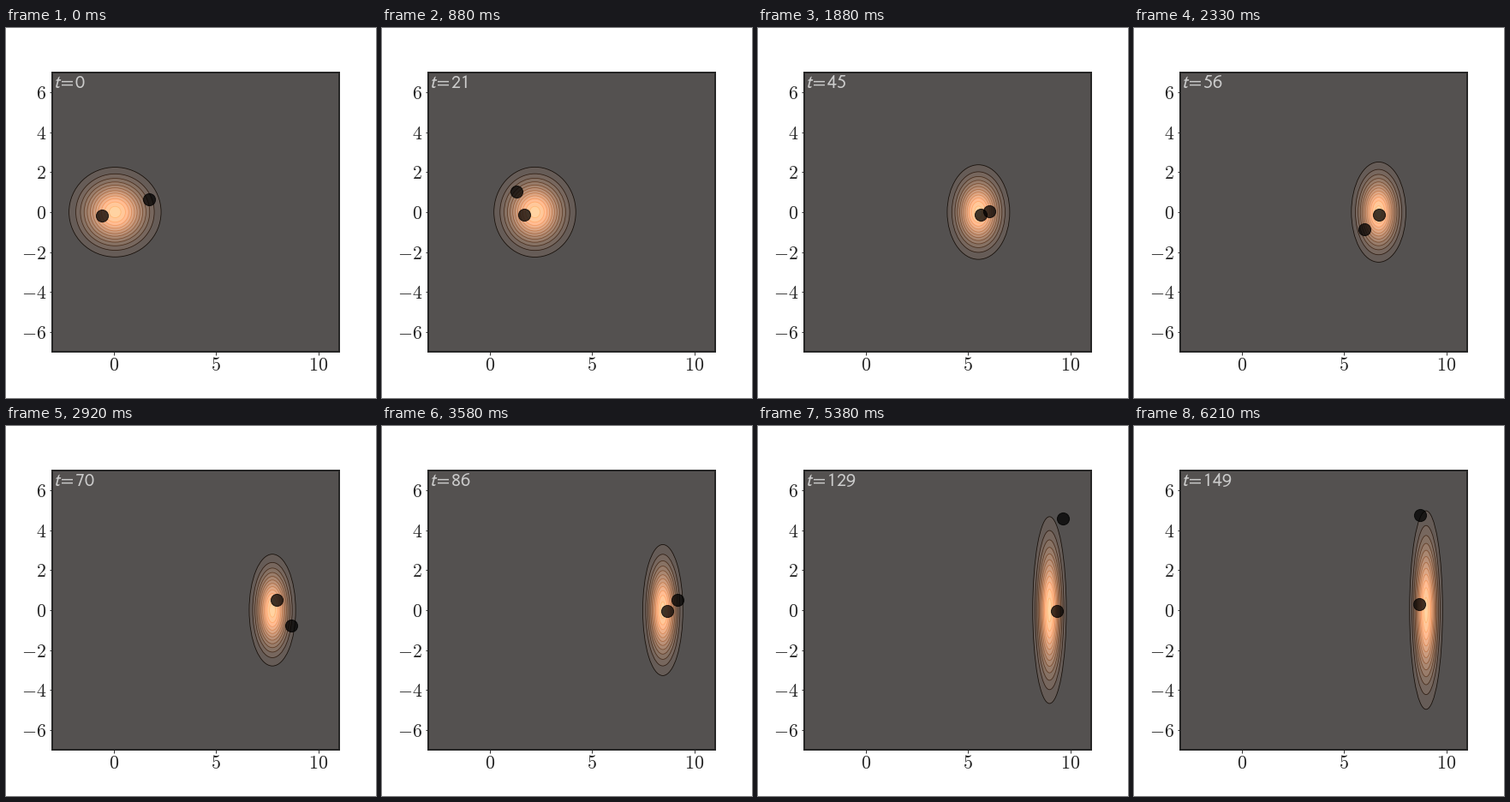
These frames come from a looping animation (432 px wide and 432 px high, 6290 ms). A matplotlib script:

```python
import numpy as np
import matplotlib.pyplot as plt
from matplotlib.animation import FuncAnimation
from matplotlib.patches import Ellipse

plt.rcParams["mathtext.fontset"] = "cm"

LOOP_MS, TICK_MS, FPS = 6290, 10, 24
LAST = 149
BANDS = 13
PEAK = 12.5  # density maximum, in contour steps
FONT = 22


def ease(t, tau, power):
    """Rise from 0 to 1 around time tau."""
    return 1 - np.exp(-(t / tau) ** power)


# Gaussian: mean along x and spread in both directions
steps = np.arange(LAST + 1)
mean = 9.01 * ease(steps + 3, 49.6, 1.75)
sigma_x = 1 - 0.645 * ease(steps, 56, 1.7)
sigma_y = 1 + 1.26 * ease(steps, 107, 3.6)

# two random samples per step
rng = np.random.default_rng(4)
draws = np.clip(rng.standard_normal((LAST + 1, 2, 2)), -2.2, 2.2)
spread = np.stack([sigma_x, sigma_y], axis=1)
centre = np.stack([mean, 0 * mean], axis=1)
samples = centre[:, None] + spread[:, None] * draws

copper = plt.get_cmap("copper")


def fill(k):
    """Copper at 70 % opacity over white."""
    return 0.7 * np.array(copper((k + 0.5) / BANDS)[:3]) + 0.3


fig = plt.figure(figsize=(6, 6), dpi=72, facecolor="white")
ax = fig.add_axes([0.125, 0.125, 0.775, 0.755], facecolor=fill(0))
ax.set(xlim=(-3, 11), ylim=(-7, 7))
xt, yt = [0, 5, 10], range(-6, 7, 2)
ax.set_xticks(xt, [f"${v}$" for v in xt])
ax.set_yticks(yt, [f"${v}$" for v in yt])
ax.tick_params(labelsize=FONT, labelcolor="0.15", length=3.5, width=0.8,
               pad=3.5)
ax.tick_params(axis="x", pad=2.5)
for spine in ax.spines.values():
    spine.set(linewidth=2, edgecolor="0.15")

levels = range(1, BANDS)
radii = [np.sqrt(2 * np.log(PEAK / k)) for k in levels]
rings = [ax.add_patch(Ellipse((0, 0), 1, 1, facecolor=fill(k),
                              edgecolor=copper(k / BANDS), linewidth=0.8,
                              zorder=1 + k / 100))
         for k in levels]
dots = ax.scatter([0, 0], [0, 0], s=200, c="k", alpha=0.75, linewidths=1,
                  zorder=3)
label = ax.text(-2.94, 6.2, "", fontsize=FONT, color="0.8", va="baseline",
                math_fontfamily="stixsans", zorder=4)


def update(i):
    t = min(int((i + 0.49) * FPS * TICK_MS / 1000), LAST)
    for ring, r in zip(rings, radii):
        ring.set(center=(mean[t], 0), width=2 * r * sigma_x[t],
                 height=2 * r * sigma_y[t])
    dots.set_offsets(samples[t])
    label.set_text(rf"$\mathsf{{t}}\hspace{{-0.08}}=\hspace{{-0.08}}"
                   rf"\mathsf{{{t}}}$")
    return [*rings, dots, label]


anim = FuncAnimation(fig, update, frames=LOOP_MS // TICK_MS, interval=TICK_MS,
                     repeat=True, repeat_delay=0, blit=False)
plt.show()
```
